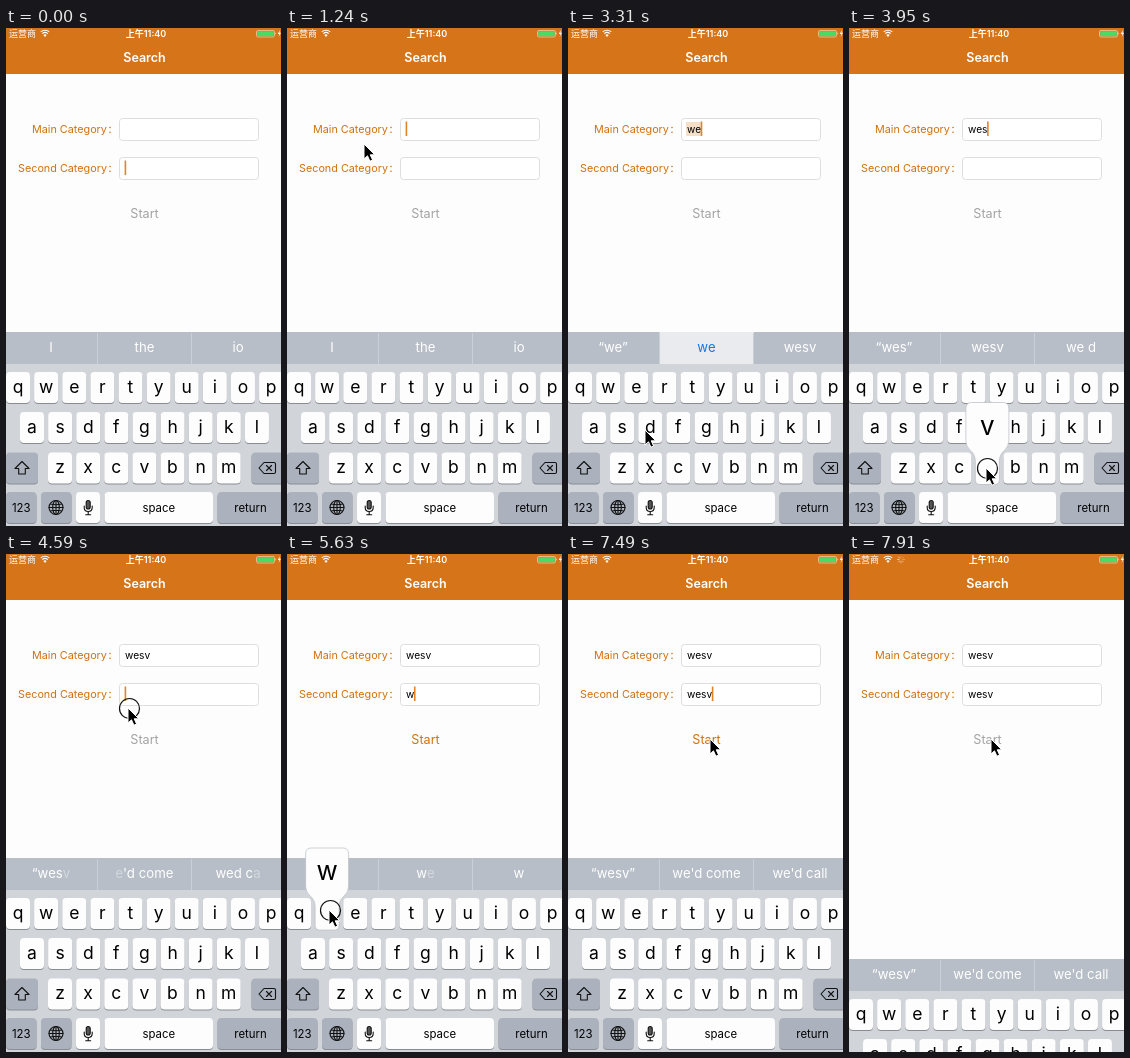
Recreate the animation shown at these times as an HTML page. Size 275x498 px, loop 8 s.

```html
<!DOCTYPE html>
<html lang="en">
<head>
<meta charset="utf-8">
<title>Search form</title>
<style>
html, body { margin: 0; width: 100%; height: 100%; overflow: hidden; background: #fdfdfd; }
svg { display: block; width: 100%; height: 100%; }
text { font-family: Inter, "Noto Sans CJK SC", "Noto Sans CJK", sans-serif; white-space: pre; }
.mid { text-anchor: middle; }
.icon { fill: none; stroke: #111; stroke-width: 1.1; stroke-linejoin: round; stroke-linecap: round; }
</style>
</head>
<body>
<svg id="stage" viewBox="0 0 275 498">
  <rect width="275" height="498" fill="#fdfdfd"/>
  <rect width="275" height="46" fill="#d67419"/>
  <g fill="#fff">
    <text x="3" y="8.8" font-size="9">运营商</text>
    <text class="mid" x="140" y="8.8" font-size="9" font-weight="600">上午11:40</text>
    <text class="mid" x="138.5" y="34" font-size="12.5" font-weight="600">Search</text>
    <path d="M39 9l-1.6-1.9a2.3 2.3 0 0 1 3.2 0z"/>
    <path d="M36.3 5.6a4 4 0 0 1 5.4 0M34.8 3.9a6.2 6.2 0 0 1 8.4 0" fill="none" stroke="#fff" stroke-width="1.2"/>
    <path d="M269.3 4.2v2.6q1.2-1.3 0-2.6M273.8 2l-2 4h1.6l-.8 3 2.4-4.2h-1.6z"/>
  </g>
  <rect x="250.5" y="2.5" width="18" height="6.5" rx="1.5" fill="none" stroke="#f3d3b2" stroke-width=".7"/>
  <rect x="251.2" y="3.2" width="16.6" height="5.1" rx="1" fill="#4cd964"/>
  <g id="spinner" stroke="#fff" stroke-width=".8" stroke-linecap="round"></g>

  <g fill="#d0720f" font-size="10.8">
    <text x="26" y="105.3">Main Category</text><text x="12" y="144.3">Second Category</text>
    <circle cx="104" cy="99.5" r=".8"/><circle cx="104" cy="104.3" r=".8"/>
    <circle cx="104" cy="138.5" r=".8"/><circle cx="104" cy="143.3" r=".8"/>
  </g>
  <g fill="#fff" stroke="#dedede">
    <rect x="113.5" y="90.5" width="139" height="22" rx="3"/>
    <rect x="113.5" y="129.5" width="139" height="22" rx="3"/>
  </g>
  <rect id="marked" x="118" y="94" height="14" fill="#f6dfc7"/>
  <text id="main" x="119" y="105" font-size="10.2"/>
  <text id="second" x="119" y="144" font-size="10.2"/>
  <rect id="caret" width="1.6" height="14.5" fill="#e28422"/>
  <text id="start" class="mid" x="138.5" y="190" font-size="12.6">Start</text>

  <g id="keyboard">
    <rect y="304" width="275" height="196" fill="#d1d5da"/>
    <rect y="304" width="275" height="32" fill="#b7bec7"/>
    <rect id="chosen" x="91.5" y="304" width="94.5" height="32" fill="#e9ebee"/>
    <path d="M91.5 305v31M185.5 305v31" stroke="#cbd0d6"/>
    <g id="hints"></g>
    <g id="keys"></g>
    <g class="icon">
      <path d="M16 433.5l7 7h-3.7v5.5h-6.6v-5.5h-3.7z"/>
      <path d="M253 440l5-5.5h10q1.5 0 1.5 1.5v8q0 1.5-1.5 1.5h-10zM260.5 437.5l5 5m0-5l-5 5"/>
      <circle cx="50" cy="479.5" r="7"/>
      <ellipse cx="50" cy="479.5" rx="3.3" ry="7"/>
      <path d="M43 479.5h14M50 472.5v14M44.3 476q5.7 1.6 11.4 0M44.3 483q5.7-1.6 11.4 0"/>
      <rect x="80.2" y="472.5" width="4" height="8.5" rx="2" fill="#555"/>
      <path d="M78.2 478v1.5q0 4 4 4t4-4v-1.5M82.2 483.5v3.2M79.7 486.7h5"/>
    </g>
    <g id="popup">
      <path d="M-12 28V9Q-12 2-17 -2Q-21.5 -6-21.5 -12V-44Q-21.5 -50-16 -50H16Q21.5 -50 21.5 -44V-12Q21.5 -6 17 -2Q12 2 12 9V28Q12 32 8 32H-8Q-12 32-12 28Z"
        fill="#fdfdfd" stroke="#b9bdc3" stroke-width=".7"/>
      <text class="mid" y="-18" font-size="26"/>
    </g>
  </g>
  <circle id="ring" r="10" fill="none" stroke="#111" stroke-width="1.2"/>
  <path id="pointer" d="M0 0V15L3.5 11.8L5.9 17.2L8.6 16L6.2 10.8H10.8Z" fill="#000" stroke="#fff" stroke-width="1"/>
</svg>
<script>
const LOOP = 8000, STEP = 208.3, LEAD = 24;
const $ = id => document.getElementById(id);
const show = (node, on) => node.setAttribute('visibility', on ? 'visible' : 'hidden');

function add(parent, tag, attrs, text = '') {
  const node = document.createElementNS('http://www.w3.org/2000/svg', tag);
  for (const name in attrs) node.setAttribute(name, attrs[name]);
  node.textContent = text;
  parent.append(node);
  return node;
}

// Keyboard
const keyAt = {};
function addKey(x, y, width, label = '', size = 17.5, fill = '#fdfdfd') {
  add($('keys'), 'rect', { x, y: y + 1, width, height: 31, rx: 4, fill: '#898d93' });
  add($('keys'), 'rect', { x, y, width, height: 31, rx: 4, fill });
  const dy = size > 15 ? 20.5 : 19.5;
  add($('keys'), 'text', { class: 'mid', x: x + width / 2, y: y + dy, 'font-size': size }, label);
}
[['qwertyuiop', 12, 344], ['asdfghjkl', 26, 384], ['zxcvbnm', 54, 424.5]].forEach(([row, x0, y]) =>
  [...row].forEach((letter, i) => {
    const x = x0 + i * 28.12;
    keyAt[letter] = [x, y];
    addKey(x - 12, y, 24, letter);
  }));
const GREY = '#abb2bd';
addKey(0, 424.5, 32, '', 11, GREY);
addKey(245.5, 424.5, 34, '', 11, GREY);
addKey(0, 464, 30.5, '123', 11.4, GREY);
addKey(35, 464, 30.5, '', 11, GREY);
addKey(70, 464, 24, '', 11);
addKey(98.5, 464, 108.5, 'space', 11.4);
addKey(211.5, 464, 66, 'return', 11.4, GREY);

const hintNodes = [45, 138.5, 232].map(x =>
  add($('hints'), 'text', { class: 'mid', x, y: 324, 'font-size': 13.2, fill: '#fff' }));

for (let i = 0; i < 8; i++) {
  add($('spinner'), 'path', { d: 'M52 3.6V2', transform: `rotate(${i * 45} 52 5.5)`, opacity: .25 + i * .09 });
}

// Cues: [step, values...]; each holds until the next one
const DEFAULT = 'I|the|io', DONE = "“wesv”|we'd come|we'd call";
const mainText = [[0, ''], [13, 'w'], [15, 'we'], [18, 'wes'], [20, 'wesv']];
const secondText = [[0, ''], [27, 'w'], [29, 'we'], [31, 'wes'], [34, 'wesv']];
// "~" fades the letter that follows
const hints = [
  [0, DEFAULT], [13, '“w”|we|with'], [15, '“we”|we|wesv'], [18, '“wes”|wesv|we d'],
  [20, DONE], [22, "“wes~v|~e'd come|wed c~a"], [23, DEFAULT], [27, '“w”|w~e|w'],
  [29, '“we”|we|wesv'], [31, '“wes”|wes~v|we d'], [34, DONE]
];
const presses = { 12: 'w', 14: 'e', 17: 's', 19: 'v', 26: 'w', 27: 'w', 28: 'e', 30: 's', 33: 'v' };
const taps = [3, 22, 37];
const path = [
  [2, 88, 112], [3, 122, 94], [4, 122, 94], [6, 77, 116], [10, 49, 356], [13, 49, 356],
  [14, 67, 358], [15, 69, 360], [16, 77, 402], [17, 56, 400], [19, 137, 440], [20, 137, 440],
  [22, 122, 154], [25, 42, 356], [27, 42, 356], [28, 67, 358], [29, 75, 402], [30, 56, 400],
  [31, 56, 400], [32, 105, 432], [33, 137, 440], [34, 137, 440], [36, 142, 185], [38, 142, 185]
];

const held = (cues, step) => cues.findLast(cue => cue[0] <= step)[1];

function pointerAt(step) {
  const next = path.findIndex(point => point[0] >= step);
  if (next <= 0) return path[0].slice(1);
  const [a, x0, y0] = path[next - 1], [b, x1, y1] = path[next];
  const p = (step - a) / (b - a), ease = p * p * (3 - 2 * p);
  return [x0 + (x1 - x0) * ease, y0 + (y1 - y0) * ease];
}

function setHint(node, text, fill) {
  node.replaceChildren();
  node.setAttribute('fill', fill);
  for (const part of text.match(/~?[^~]/g)) {
    add(node, 'tspan', { 'fill-opacity': part.length > 1 ? .4 : 1 }, part.at(-1));
  }
}

function draw(step) {
  const first = held(mainText, step), other = held(secondText, step);
  const onMain = step >= 3 && step < 22;
  const leaving = step >= 38, key = presses[step];
  const picked = (step >= 15 && step < 18) || step === 29;

  $('main').textContent = first;
  $('second').textContent = other;
  const field = $(onMain ? 'main' : 'second');
  const width = field.textContent ? field.getComputedTextLength() : 0;
  $('caret').setAttribute('x', 118.6 + width);
  $('caret').setAttribute('y', onMain ? 93.5 : 132.5);
  const typing = (step >= 12 && step < 20) || (step >= 26 && step < 35);
  show($('caret'), !leaving && (typing || step % 5 < 3));
  $('marked').setAttribute('width', onMain ? width + 1 : 0);
  show($('marked'), picked && onMain);

  $('start').setAttribute('fill', other && step < 37 ? '#d0720f' : '#a3a3a3');
  show($('spinner'), leaving);
  $('keyboard').setAttribute('transform', `translate(0 ${leaving ? 101 : 0})`);
  show($('chosen'), picked);
  held(hints, step).split('|').forEach((text, i) =>
    setHint(hintNodes[i], text, picked && i === 1 ? '#1678e0' : '#fff'));

  show($('popup'), key);
  if (key) {
    $('popup').setAttribute('transform', `translate(${keyAt[key]})`);
    $('popup').lastElementChild.textContent = key;
  }

  const [x, y] = pointerAt(step);
  show($('pointer'), step >= 2);
  show($('ring'), key || taps.includes(step));
  $('pointer').setAttribute('transform', `translate(${x} ${y})`);
  $('ring').setAttribute('transform', `translate(${x + 1.5} ${y + .5})`);
}

let shown = -1;
function tick() {
  const time = performance.now() % LOOP;
  const step = Math.min(38, Math.floor((time + LEAD) / STEP));
  if (step !== shown) draw(shown = step);
  requestAnimationFrame(tick);
}
tick();
</script>
</body>
</html>
```
